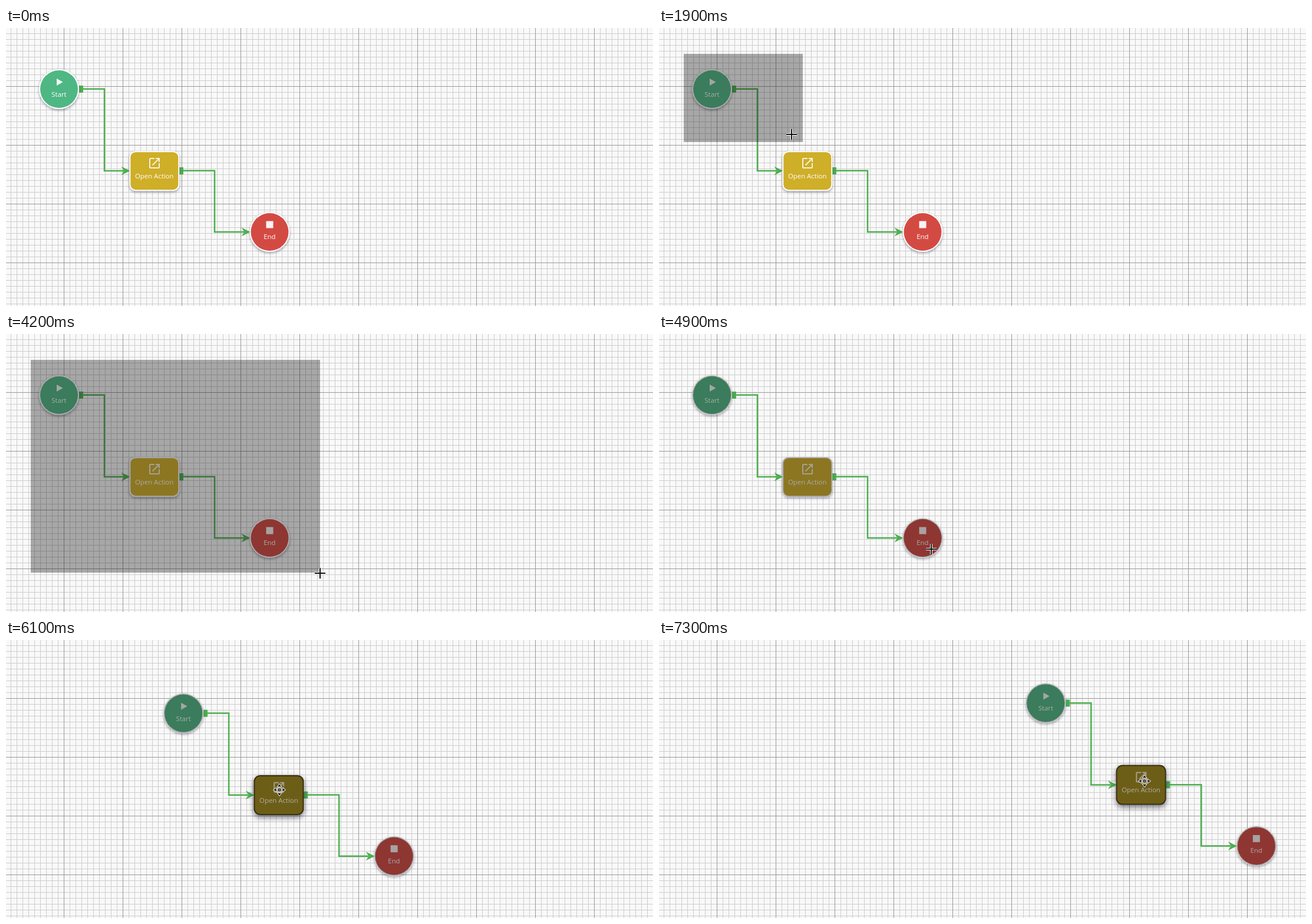
Recreate the animation shown at these times as an HTML page. Size 1098x473 px, loop 8 s.

```html
<!DOCTYPE html>
<html lang="en">
<head>
<meta charset="utf-8">
<title>Flow editor</title>
<style>
  html, body { margin: 0; width: 100%; height: 100%; overflow: hidden; background: #f9f9f9; }
  svg { display: block; width: 1098px; height: 473px; }
  text { font: 500 11.4px "Open Sans", "Noto Sans", sans-serif; fill: #fff; text-anchor: middle; }
  .node { filter: drop-shadow(0 2px 2px rgba(40, 40, 70, .42)); }
  .link { fill: none; stroke: #4caf50; stroke-width: 2.5; }
  .port, .arrow { fill: #4caf50; }
  .rim { fill: #fff; }
  .shade { fill: #151515; fill-opacity: .36; visibility: hidden; }
  .selected .shade { visibility: visible; }
  .icon { fill: #fff; fill-opacity: .93; }
  .action .icon { fill-opacity: .82; }
  .hovered .action { filter: drop-shadow(0 4px 5px rgba(30, 30, 50, .6)); }
  .hovered .action .rim { fill: #383010; }
  .hovered .action .body { fill: #6d5e17; }
  .hovered .action .shade { visibility: hidden; }
  .hovered .action text, .hovered .action .icon { fill: #b0aea6; }
  .halo { fill: none; stroke: #fff; stroke-width: 4; }
  .ink { fill: none; stroke: #111; stroke-width: 2; }
  #grab { fill: #222; stroke: #fff; }
</style>
</head>
<body>
<svg viewBox="0 0 1098 473">
  <defs>
    <pattern id="minor" x="8" y="9" width="10" height="10" patternUnits="userSpaceOnUse">
      <path d="M0 0H10V1H1V10H0Z" fill="#cdcdcd" shape-rendering="crispEdges"/>
    </pattern>
    <pattern id="major" x="98" y="99" width="100" height="100" patternUnits="userSpaceOnUse">
      <path d="M0 0H100V1H1V100H0Z" fill="#999" shape-rendering="crispEdges"/>
    </pattern>
    <path id="tip" d="M0 0L-15-7.5L-10 0L-15 7.5Z"/>
    <path id="cross" d="M-9 0H9M0-9V9"/>
  </defs>

  <rect width="1098" height="473" fill="#f9f9f9"/>
  <rect width="1098" height="473" fill="url(#minor)"/>
  <rect width="1098" height="473" fill="url(#major)"/>

  <g id="flow">
    <path class="link" d="M128 103.8H167V243H200"/>
    <path class="link" d="M298 242.8H354V347H404"/>
    <rect class="port" x="124" y="98" width="7" height="12"/>
    <rect class="port" x="294" y="237" width="7" height="12"/>
    <use class="arrow" href="#tip" x="210.5" y="243"/>
    <use class="arrow" href="#tip" x="414.5" y="347"/>

    <g class="node">
      <circle class="rim" cx="90" cy="104" r="34"/>
      <circle cx="90" cy="104" r="32" fill="#4fb783"/>
      <path class="icon" d="M86 86L96.5 92L86 98Z"/>
      <text x="90" y="117">Start</text>
      <circle class="shade" cx="90" cy="104" r="33.6"/>
    </g>
    <g class="node action">
      <rect class="rim" x="209.3" y="209.2" width="85" height="68" rx="11"/>
      <rect class="body" x="211.3" y="211.2" width="81" height="64" rx="9" fill="#cfae28"/>
      <path class="icon" transform="translate(240 218)" d="M19 19H5V5h7V3H5a2 2 0 0 0-2 2v14a2 2 0 0 0 2 2h14a2 2 0 0 0 2-2v-7h-2zM14 3v2h3.6l-9.8 9.8 1.4 1.4L19 6.4V10h2V3z"/>
      <text x="251.7" y="256">Open Action</text>
      <rect class="shade" x="209.5" y="209.4" width="84.6" height="67.6" rx="11"/>
    </g>
    <g class="node">
      <circle class="rim" cx="447.5" cy="347" r="34"/>
      <circle cx="447.5" cy="347" r="32" fill="#d34a43"/>
      <rect class="icon" x="441.5" y="328.5" width="12" height="12"/>
      <text x="447.3" y="359">End</text>
      <circle class="shade" cx="447.5" cy="347" r="33.6"/>
    </g>
  </g>

  <rect id="marquee" x="42" y="44" fill="#151515" fill-opacity=".36"/>

  <g id="pointer">
    <g id="aim">
      <use class="halo" href="#cross"/>
      <use class="ink" href="#cross"/>
    </g>
    <g id="grab">
      <path d="M0-10.5L4-5H-4ZM0 10.5L4 5H-4ZM-10.5 0L-5-4V4ZM10.5 0L5-4V4Z"/>
      <rect x="-3" y="-3" width="6" height="6"/>
      <circle r=".5"/>
    </g>
  </g>
</svg>

<script>
const LOOP = 8000, TICK = 100;
const PRESS = 1600, RELEASE = 4700, HOVER = 5300;
const $ = id => document.getElementById(id);
const flow = $('flow'), marquee = $('marquee'), pointer = $('pointer');

const smooth = u => u * u * (3 - 2 * u);
const linear = u => u;
const easeIn = u => u * u;
const easeOut = u => u * (2 - u);
const leg = (start, end, x, y, ease = smooth) => ({ start, end, x, y, ease });

// Each leg moves on from where the previous one stopped.
const drag = [
  leg(5500, 5800, 56.3, 17.4, easeIn), leg(5800, 6400, 366, 24, linear),
  leg(6400, 6500, 431.3, 15), leg(6500, 7000, 566.3, -20, easeOut), leg(7100, 7300, 566.3, 3.4),
];
const select = [leg(1500, 2400, 526, 404), leg(2600, 3000, 533, 406)];
// Pointer position in the flow's own coordinates
const point = [
  leg(600, 900, 54, 48, easeOut), leg(1100, 1200, 48, 52), leg(1300, 1400, 43, 44),
  leg(1500, 2450, 520, 402), leg(2600, 3000, 533, 407), leg(4300, 4400, 534, 412),
  leg(4600, 5500, 256, 236), leg(5500, 5800, 246, 234), leg(5800, 6500, 263, 236),
  leg(6500, 7000, 258, 237),
];

function travel(legs, t, x = 0, y = 0) {
  for (const l of legs) {
    if (t <= l.start) break;
    const k = l.ease(Math.min(1, (t - l.start) / (l.end - l.start)));
    x += (l.x - x) * k;
    y += (l.y - y) * k;
  }
  return [x, y];
}

const show = (el, on) => el.setAttribute('visibility', on ? 'visible' : 'hidden');
const place = (el, x, y) => el.setAttribute('transform', `translate(${x} ${y})`);

function draw(t) {
  const [dx, dy] = travel(drag, t);
  const [x, y] = travel(point, t, 112, 51);
  const [right, bottom] = travel(select, t, 42, 44).map(Math.round);
  const hovered = t >= HOVER;

  place(flow, dx, dy);
  flow.classList.toggle('selected', t >= RELEASE);
  flow.classList.toggle('hovered', hovered);

  marquee.setAttribute('width', right - 42);
  marquee.setAttribute('height', bottom - 44);
  show(marquee, t >= PRESS && t < RELEASE);

  place(pointer, Math.round(x + dx), Math.round(y + dy));
  show($('aim'), t >= 600 && !hovered);
  show($('grab'), hovered);
}

const start = performance.now();
function frame() {
  const t = (performance.now() - start) % LOOP;
  draw(Math.floor(t / TICK) * TICK);
  requestAnimationFrame(frame);
}
frame();
</script>
</body>
</html>
```
